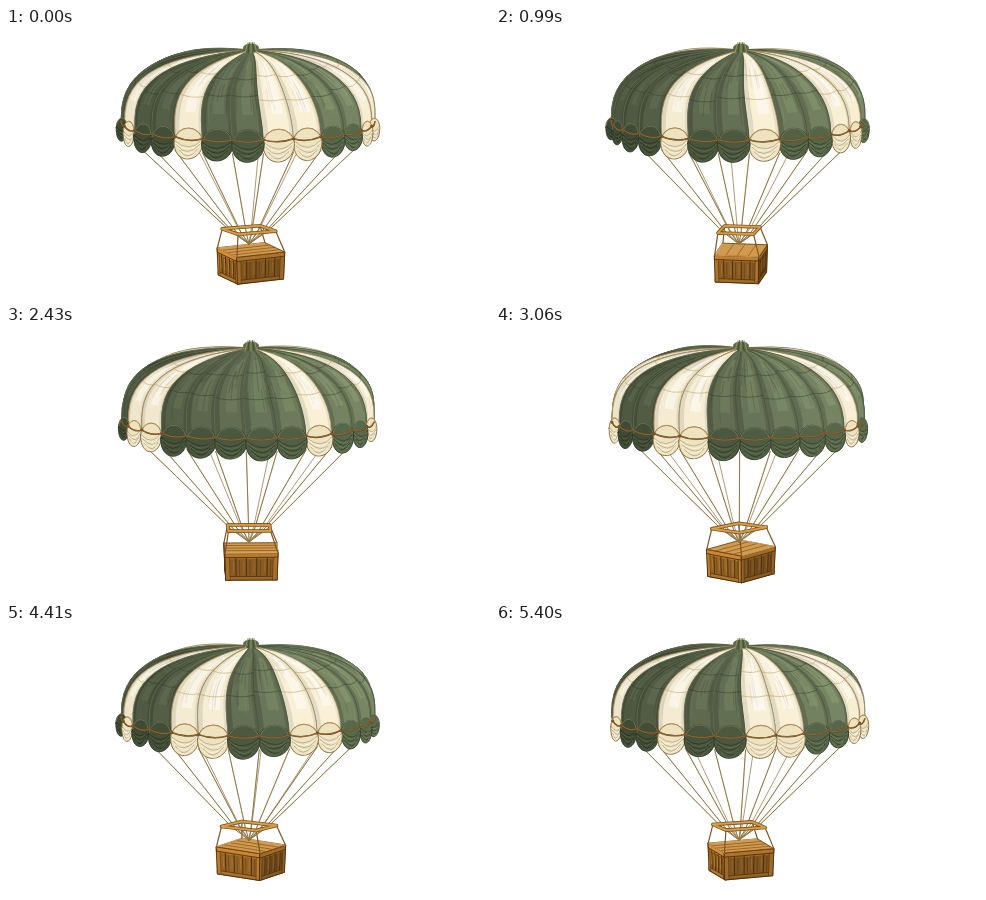
Write an HTML page with a canvas that moves like this. It is 484x270 px and loops after 5490 ms.

```html
<!DOCTYPE html>
<html lang="en">
<head>
<meta charset="utf-8">
<title>Parachute crate</title>
<style>
html, body { margin: 0; width: 100%; height: 100%; overflow: hidden; background: #fff; }
canvas { display: block; width: 484px; height: 270px; }
</style>
</head>
<body>
<canvas id="stage" width="484" height="270"></canvas>
<script>
const ctx = document.getElementById('stage').getContext('2d');
const STEP = 90, STEPS = 61, GORES = 17;
const RAD = Math.PI / 180, GORE = 14 * RAD;
const CREAM_GORES = new Set([1, 2, 5, 6, 12, 15]);
const GREEN = [124, 139, 104], CREAM = [249, 240, 214], WOOD = [186, 125, 48];
const { sin, cos, abs, floor, PI } = Math;

const tone = (c, f, alpha = 1) => `rgba(${c.map(v => Math.min(255, Math.round(v * f)))},${alpha})`;
const mod = (i, n) => ((i % n) + n) % n;
const noise = n => { const v = sin(n * 127.1 + 11.7) * 43758.5453; return v - floor(v); };

function path(points, closed = false) {
  ctx.beginPath();
  points.forEach(([x, y], i) => i ? ctx.lineTo(x, y) : ctx.moveTo(x, y));
  if (closed) ctx.closePath();
}
function line(points, color, width = 1) {
  path(points);
  ctx.strokeStyle = color;
  ctx.lineWidth = width;
  ctx.stroke();
}
function shape(points, fill, stroke, width = 1) {
  path(points, true);
  ctx.fillStyle = fill;
  ctx.fill();
  if (stroke) {
    ctx.strokeStyle = stroke;
    ctx.lineWidth = width;
    ctx.stroke();
  }
}

// Point on the canopy: fall is the angle from the crown, turn the azimuth.
// The cloth lags slightly behind the hem between crown and rim.
function dome(fall, turn) {
  const r = Math.pow(sin(fall), 0.86);
  const height = Math.pow(Math.max(0, cos(fall)), 0.7);
  const azimuth = turn - 0.055 * sin(2 * fall);
  return [242 + 3 * cos(fall) + 127 * r * sin(azimuth), 94 - 72 * height + 22 * r * cos(azimuth)];
}
function meridian(turn, from = 0.03, to = PI / 2) {
  return Array.from({ length: 17 }, (_, i) => dome(from + (to - from) * i / 16, turn));
}
function parallel(fall, from, to, sag) {
  return Array.from({ length: 7 }, (_, i) => {
    const [x, y] = dome(fall, from + (to - from) * i / 6);
    return [x, y + sag * sin(PI * i / 6)];
  });
}
const strip = (a, b, from, to) => [...meridian(a, from, to), ...meridian(b, from, to).reverse()];

function drawGore(id, mid) {
  const cream = CREAM_GORES.has(id);
  const base = cream ? CREAM : GREEN;
  const light = cream ? 0.96 + 0.04 * cos(mid - 0.5) : 0.79 + 0.19 * sin(mid + 0.12);
  const a = mid - GORE / 2, b = mid + GORE / 2;
  shape(strip(a, b), tone(base, light), cream ? '#93794a' : '#3c4b36', 0.7);
  shape(strip(a, a + GORE * 0.18), tone(base, light * 0.74, cream ? 0.35 : 0.6));
  shape(strip(b - GORE * 0.1, b), tone(base, light * 0.75, cream ? 0.3 : 0.5));
  shape(strip(mid - GORE * 0.1, mid + GORE * 0.28, 0.35, 1.3), tone(base, light * 1.2, 0.5));

  for (let k = 0; k < 12; k++) {
    const seed = id * 31 + k * 7;
    const turn = a + GORE * (0.08 + 0.84 * noise(seed));
    const from = 0.12 + noise(seed + 1) * 0.9;
    const stroke = tone(base, light * (k % 3 ? 0.72 : 1.22), cream ? 0.25 : 0.5);
    line(meridian(turn, from, from + 0.2 + noise(seed + 2) * 0.32), stroke, 0.8);
  }
  for (const fall of [0.67, 1.06]) {
    const seam = fall + (noise(id + fall) - 0.5) * 0.12;
    line(parallel(seam, a, b, 1.6), cream ? 'rgba(184,145,75,.6)' : 'rgba(47,62,40,.6)', 0.8);
  }
  line(meridian(a), cream ? '#a58a55' : '#8a936f', 0.4);
}

function drawFlap(id, mid) {
  const cream = CREAM_GORES.has(id);
  const base = cream ? [240, 228, 193] : [91, 107, 76];
  const c = cos(mid), light = cream ? 0.99 : 0.84 + 0.16 * sin(mid);
  const x = 242 + 127 * sin(mid), y = 98 + 18 * c;
  const rx = Math.max(5.5, 16.3 * c), up = 9 + 5.5 * c;
  const down = 11.5 + 6 * c + noise(id + 0.3) * 2.5;
  ctx.beginPath();
  ctx.ellipse(x, y, rx, up, 0, PI, 2 * PI);
  ctx.bezierCurveTo(x + rx, y + down * 1.2, x - rx, y + down * 1.4, x - rx, y);
  ctx.closePath();
  ctx.fillStyle = tone(base, light);
  ctx.fill();
  ctx.strokeStyle = cream ? '#80673a' : '#2f3c29';
  ctx.lineWidth = 0.9;
  ctx.stroke();
  for (let k = 0; k < 6; k++) {
    const top = y - 1 + k * down * 0.13;
    const w = rx * (0.94 - k * 0.075);
    ctx.beginPath();
    ctx.moveTo(x - w, top);
    ctx.quadraticCurveTo(x + (noise(id + k) - 0.5) * 7, top + down * 0.72, x + w, top - 1);
    ctx.strokeStyle = tone(base, light * (k % 2 ? 1.25 : 0.62), cream ? 0.55 : 0.8);
    ctx.lineWidth = 1;
    ctx.stroke();
  }
  ctx.beginPath();
  ctx.ellipse(x, y - 1, rx * 0.92, up * 0.92, 0, PI * 1.05, PI * 1.95);
  ctx.strokeStyle = cream ? '#c8a365' : '#8d9670';
  ctx.lineWidth = 0.6;
  ctx.stroke();
}

function drawHemRope(a, b) {
  const hem = turn => [242 + 127 * sin(turn), 94 + 18 * cos(turn)];
  const [x1, y1] = hem(a), [x2, y2] = hem(b);
  for (const [color, width] of [['#5e4220', 1.5], ['#a97a3f', 0.7]]) {
    ctx.beginPath();
    ctx.moveTo(x1, y1);
    ctx.quadraticCurveTo((x1 + x2) / 2, (y1 + y2) / 2 + 5, x2, y2);
    ctx.strokeStyle = color;
    ctx.lineWidth = width;
    ctx.stroke();
  }
  ctx.fillStyle = '#7c5527';
  ctx.beginPath();
  ctx.arc(x1, y1, 1.6, 0, 2 * PI);
  ctx.fill();
}

function drawCanopy(gores) {
  const byDepth = [...gores].sort((p, q) => abs(q.mid) - abs(p.mid));
  // Cloth closing the far side, out of reach of the visible gores.
  shape(strip(115 * RAD, 245 * RAD), '#66744f');
  byDepth.forEach(g => drawGore(g.id, g.mid));
  const front = byDepth.filter(g => abs(g.mid) < 86 * RAD);
  front.forEach(g => drawFlap(g.id, g.mid));
  front.forEach(g => drawHemRope(g.mid - GORE / 2, g.mid + GORE / 2));

  ctx.beginPath();
  ctx.ellipse(245, 20, 8, 4.5, 0, 0, 2 * PI);
  ctx.fillStyle = '#5c6945';
  ctx.fill();
  for (let k = -2; k <= 2; k++) {
    line([[245 + k * 1.6, 14.5], [245 + k * 3, 25]], k % 2 ? '#3a4830' : '#a19c6d', 0.8);
  }
}

function drawRopes(gores) {
  for (const { id, mid } of gores) {
    const turn = mid - GORE / 2;
    if (abs(turn) > 63 * RAD) continue;
    const s = sin(turn), c = cos(turn);
    const rope = [[242 + 127 * s, 106 + 20 * c], [243 + 22 * s, 200 + 5 * c], [243, 216]];
    line(rope, '#7b6337', 1);
    line(rope, '#bda06a', 0.35);
    if (id % 3 === 0) {
      line([[242 - 96 * s, 112], [243 - 20 * s, 199], [243, 216]], '#94794b', 0.75);
    }
  }
}

// Rectangle seen from above at a given yaw, corners in order around it.
function box(cx, cy, w, d, yaw, tilt) {
  return [[-1, 1], [1, 1], [1, -1], [-1, -1]].map(([sx, sz]) => {
    const x = sx * w / 2, z = sz * d / 2;
    return [cx + x * cos(yaw) + z * sin(yaw), cy + tilt * (z * cos(yaw) - x * sin(yaw))];
  });
}
const mix = ([x1, y1], [x2, y2], k) => [x1 + (x2 - x1) * k, y1 + (y2 - y1) * k];

function drawCrate(yaw) {
  const lid = box(245, 222, 45, 53, yaw, 0.23);
  const base = box(245, 249, 43.5, 51, yaw, 0.23);
  for (let i = 0; i < 4; i++) {
    const facing = yaw + i * PI / 2;
    if (cos(facing) <= 0) continue;
    const j = (i + 1) % 4;
    const [a, b, c, d] = [lid[i], lid[j], base[j], base[i]];
    const light = 0.86 - 0.14 * sin(facing);
    const side = (u, v) => mix(mix(a, b, u), mix(d, c, u), v);
    const panel = (u1, v1, u2, v2) => [side(u1, v1), side(u2, v1), side(u2, v2), side(u1, v2)];
    shape([a, b, c, d], tone(WOOD, light), '#452709', 1.2);
    shape(panel(0.09, 0.22, 0.91, 0.88), tone(WOOD, light * 0.84));
    for (let k = 1; k < 5; k++) {
      line([side(k / 5, 0.2), side(k / 5, 0.9)], '#4f2e0a', 1);
      line([side(k / 5 + 0.07, 0.26), side(k / 5 + 0.07, 0.82)], tone(WOOD, light * 0.6), 0.7);
      line([side(k / 5 - 0.05, 0.3), side(k / 5 - 0.05, 0.7)], tone(WOOD, light * 1.1), 0.6);
    }
    shape(panel(0, 0, 1, 0.16), tone(WOOD, light * 1.15), '#53310c', 0.9);
    shape(panel(0, 0.87, 1, 1), tone(WOOD, light * 0.98), '#4c2c0a', 0.7);
    for (const u of [0, 0.92]) shape(panel(u, 0.16, u + 0.08, 1), tone(WOOD, light * 1.05), '#53310c', 0.6);
  }
  shape(lid, '#d19b4f', '#6e4314', 0.9);
  for (let k = 1; k < 4; k++) {
    line([mix(lid[0], lid[1], k / 4), mix(lid[3], lid[2], k / 4)], '#8f5b20', 0.8);
  }
  line([lid[3], lid[0], lid[1]], '#e8be78', 0.7);
  return lid;
}

function drawRing(ring) {
  const loop = [...ring, ring[0]];
  line(loop, '#72470f', 3.6);
  line(loop, '#c78d3e', 2.3);
  line(loop, '#e0b467', 0.6);
}

function draw(step) {
  ctx.fillStyle = '#fff';
  ctx.fillRect(0, 0, 484, 270);
  ctx.lineJoin = ctx.lineCap = 'round';

  const phase = 2 * PI * step / STEPS;
  const shift = GORES * step / STEPS - 0.22 * sin(phase);
  const centre = Math.round(-shift);
  const gores = [];
  for (let i = centre - 8; i <= centre + 8; i++) {
    gores.push({ id: mod(i, GORES), mid: (i + shift) * GORE });
  }
  const yaw = phase - 64 * RAD - 11 * RAD * sin(phase);

  const lid = drawCrate(yaw);
  const ring = box(243, 202, 36, 42, yaw, 0.17);
  ring.forEach((p, i) => line([p, lid[i]], '#79572a', 1.2));
  drawRopes(gores);
  drawRing(ring);
  drawCanopy(gores);
}

function tick() {
  draw(floor(performance.now() / STEP) % STEPS);
  requestAnimationFrame(tick);
}
tick();
</script>
</body>
</html>
```
